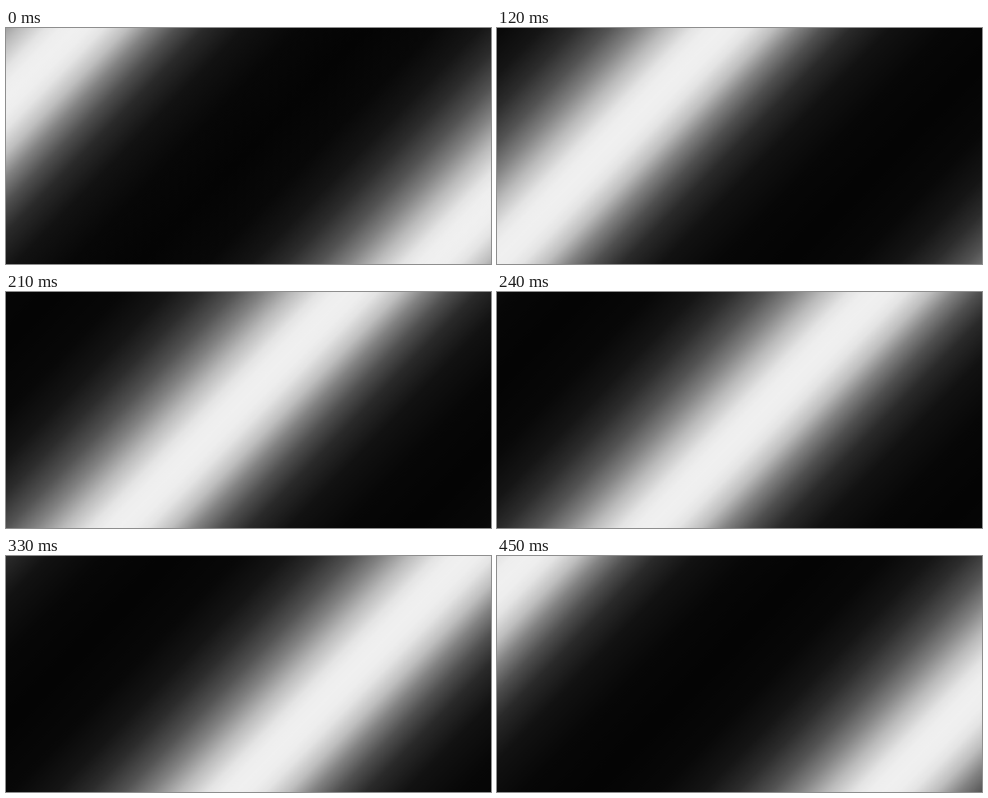
Write an HTML page without scripts that moves like this. It is 863x421 px and loops after 0.48 s.

```html
<!DOCTYPE html>
<html lang="en">
<head>
<meta charset="utf-8">
<title>Drifting light band</title>
<style>
  html, body {
    margin: 0;
    width: 100%;
    height: 100%;
    overflow: hidden;
    background: #000;
  }
  svg {
    display: block;
    width: 863px;
    height: 421px;
  }
  .band {
    --period: 1042px;
    animation: drift 480ms infinite;
  }
  /* Fifteen equal steps per period; the tenth position is held twice as long. */
  @keyframes drift {
    0% {
      transform: translateX(0);
      animation-timing-function: steps(9);
    }
    56.25% {
      transform: translateX(calc(var(--period) * 9 / 15));
      animation-timing-function: step-end;
    }
    68.75% {
      transform: translateX(calc(var(--period) * 10 / 15));
      animation-timing-function: steps(5);
    }
    100% {
      transform: translateX(var(--period));
    }
  }
</style>
</head>
<body>
<svg viewBox="0 0 863 421">
  <defs>
    <linearGradient id="glow" gradientUnits="userSpaceOnUse" spreadMethod="repeat"
                    x1="123" y1="0" x2="659.9" y2="520.8">
      <stop offset="0" stop-color="#f0f0f0"/>
      <stop offset=".025" stop-color="#eee"/>
      <stop offset=".05" stop-color="#e4e4e4"/>
      <stop offset=".09" stop-color="#bebebe"/>
      <stop offset=".13" stop-color="#828282"/>
      <stop offset=".173" stop-color="#505050"/>
      <stop offset=".221" stop-color="#2a2a2a"/>
      <stop offset=".288" stop-color="#121212"/>
      <stop offset=".384" stop-color="#070707"/>
      <stop offset=".5" stop-color="#040404"/>
      <stop offset=".616" stop-color="#080808"/>
      <stop offset=".693" stop-color="#151515"/>
      <stop offset=".75" stop-color="#2c2c2c"/>
      <stop offset=".808" stop-color="#535353"/>
      <stop offset=".856" stop-color="#828282"/>
      <stop offset=".904" stop-color="#bababa"/>
      <stop offset=".95" stop-color="#e4e4e4"/>
      <stop offset=".975" stop-color="#eee"/>
      <stop offset="1" stop-color="#f0f0f0"/>
    </linearGradient>
  </defs>
  <rect class="band" x="-1042" width="1905" height="421" fill="url(#glow)"/>
</svg>
</body>
</html>
```
